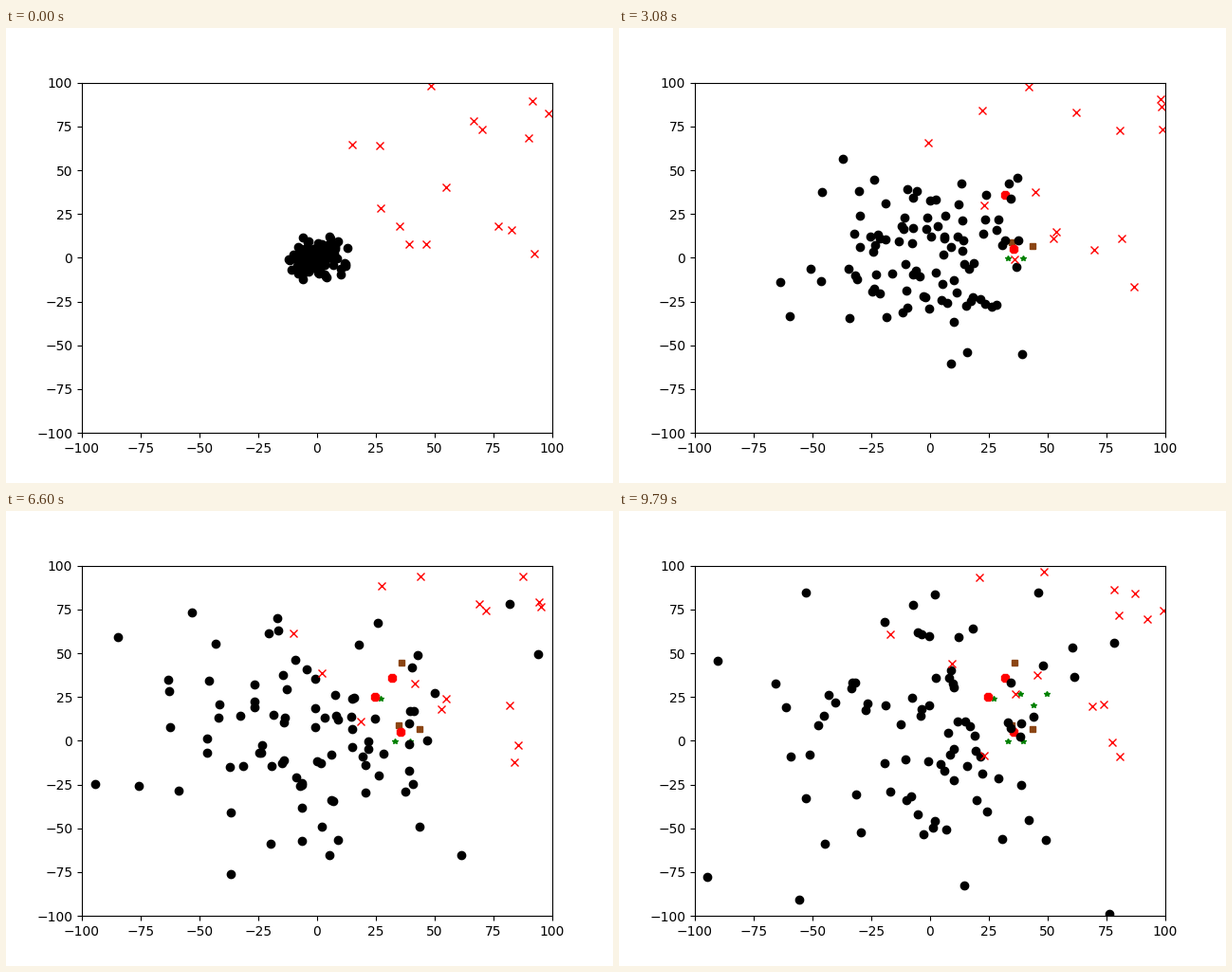
A matplotlib script for the animation above (9900 ms loop, 640 by 480 pixels).

```python
import numpy as np
import matplotlib.pyplot as plt
from matplotlib.animation import FuncAnimation

FRAMES, INTERVAL = 90, 110
WALKERS = 100
BLACK_STEP, RED_STEP = 7, 2.6
FLASH = 2
rng = np.random.default_rng(21)

RED_START = [(48.5, 98), (91.5, 89.5), (98.5, 82.5), (66.5, 78), (70, 73),
             (90, 68.5), (15, 64.5), (26.5, 64), (55, 40), (27, 28.5),
             (35, 18), (39, 8), (46.5, 8), (77, 18), (82.5, 16), (92.5, 2.5)]

# Marks that appear in place: (x, y, first step, end step)
BLASTS = [(35.5, 5, 22, FRAMES), (32, 36, 25, FRAMES), (24.5, 25, 53, FRAMES)]
BROWN = [(34.5, 9, 22, FRAMES), (43.5, 6.5, 22, FRAMES), (36, 44.5, 34, FRAMES),
         (17, 29, 53, 58), (16, 23, 53, 58), (26.5, 18.5, 53, 58)]
GREEN = [(33, -0.5, 22, FRAMES), (39.5, -0.5, 22, FRAMES), (27, 24, 53, FRAMES),
         (23.5, 15.5, 53, 58), (38.5, 27, 84, FRAMES), (44, 20, 84, FRAMES),
         (49.5, 26.5, 84, FRAMES)]


def steps(count, n, reach):
    return rng.uniform(-reach, reach, (count, n, 2))


# The crowd leaves the centre and has made two moves when the loop opens
black = steps(WALKERS, FRAMES + 1, BLACK_STEP).cumsum(axis=1)[:, 1:]

# Each casualty takes the nearest walker out of the crowd for good
for x, y, first, _ in sorted(BROWN + GREEN, key=lambda e: e[2]):
    gap = np.hypot(*(black[:, first] - (x, y)).T)
    black[np.nanargmin(gap), first:] = np.nan

moves = steps(len(RED_START), FRAMES, RED_STEP)
moves[:, 0] = RED_START
red = 100 - np.abs(100 - moves.cumsum(axis=1))  # bounce off the far edges

fig, ax = plt.subplots(figsize=(6.4, 4.8), dpi=100)
ax.set_xlim(-100, 100)
ax.set_ylim(-100, 100)


def layer(marker, color, size):
    return ax.plot([], [], marker, color=color, markersize=size, linestyle="None")[0]


brown_dots = layer("s", "saddlebrown", 4)
green_stars = layer("*", "green", 4)
blast_marks = layer("8", "red", 6)
black_dots = layer("o", "black", 6)
red_marks = layer("x", "red", 6)
flashes = layer("o", "y", 10)


def show(artist, points):
    artist.set_data([p[0] for p in points], [p[1] for p in points])


def active(events, n):
    return [e for e in events if e[2] <= n < e[3]]


def update(n):
    live = active(BLASTS, n)
    show(brown_dots, active(BROWN, n))
    show(green_stars, active(GREEN, n))
    show(blast_marks, [e for e in live if n >= e[2] + FLASH])
    show(flashes, [e for e in live if n < e[2] + FLASH])
    show(black_dots, black[:, n])
    show(red_marks, red[:, n])
    return brown_dots, green_stars, blast_marks, black_dots, red_marks, flashes


anim = FuncAnimation(fig, update, frames=FRAMES, interval=INTERVAL,
                     repeat=True, repeat_delay=0)
plt.show()
```
